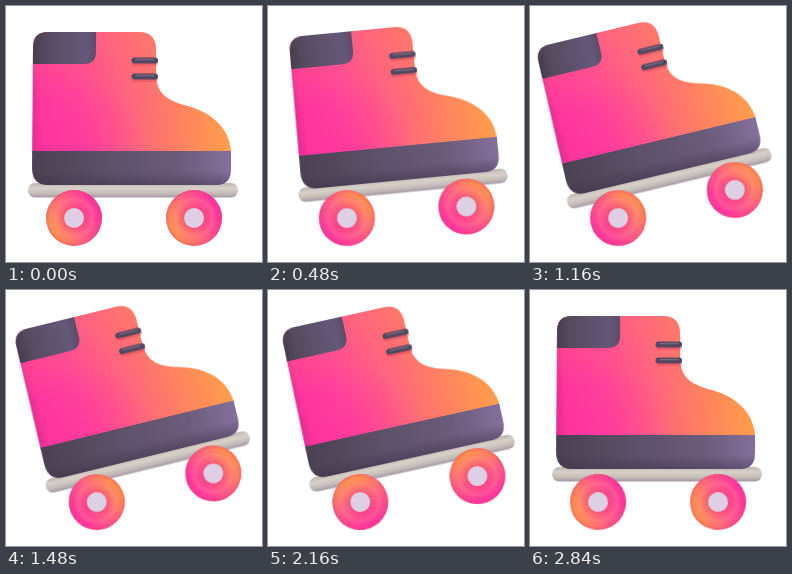
Animation, 256 px wide and 256 px high, one loop 2.88 s. Source, as an HTML page:

```html
<!DOCTYPE html>
<html lang="en">
<head>
<meta charset="utf-8">
<title>Roller skate</title>
<style>
  html, body { margin: 0; width: 100%; height: 100%; overflow: hidden; background: #fff; }
  svg { display: block; width: 100vw; height: 100vh; }

  .roll, .tilt, .body, .wheel { animation: 2880ms linear infinite; }
  .roll { animation-name: roll; }
  .tilt { animation-name: tilt; }
  .body { animation-name: settle; }
  .wheel { animation-name: spin; }
  .tilt, .rear { transform-origin: 68px 212px; }
  .front { transform-origin: 188px 212px; }

  @keyframes roll {
    0% { transform: translateX(0); animation-timing-function: cubic-bezier(.2, .5, .6, 1); }
    72.22% { transform: translateX(24.8px); animation-timing-function: cubic-bezier(.4, 0, .42, 1); }
    100% { transform: translateX(0); }
  }
  @keyframes tilt {
    0% { transform: rotate(0deg); animation-timing-function: cubic-bezier(.3, 0, .5, 1); }
    45.83%, 72.22% { transform: rotate(-13.8deg); animation-timing-function: cubic-bezier(.37, 0, .63, 1); }
    86.11%, 100% { transform: rotate(0deg); }
  }
  @keyframes settle {
    0% { transform: translateY(0); }
    30%, 75% { transform: translateY(1px); animation-timing-function: ease-in-out; }
    86.11% { transform: translateY(3.5px); animation-timing-function: ease-in-out; }
    98%, 100% { transform: translateY(0); }
  }
  @keyframes spin {
    0% { transform: rotate(0deg); animation-timing-function: cubic-bezier(.45, 0, .5, 1); }
    44.44%, 65% { transform: rotate(540deg); }
    75% { transform: rotate(465deg); }
    87.5% { transform: rotate(297deg); animation-timing-function: cubic-bezier(.3, .3, .6, 1); }
    100% { transform: rotate(0deg); }
  }
</style>
</head>
<body>
<svg viewBox="0 0 256 256">
  <defs>
    <linearGradient id="leather" gradientUnits="userSpaceOnUse" x1="26" y1="118" x2="226" y2="106">
      <stop offset="0" stop-color="#e02c90"/>
      <stop offset=".05" stop-color="#ff359f"/>
      <stop offset=".25" stop-color="#ff459a"/>
      <stop offset=".5" stop-color="#ff657f"/>
      <stop offset=".72" stop-color="#ff8062"/>
      <stop offset="1" stop-color="#ffa04a"/>
    </linearGradient>
    <linearGradient id="warmTop" x2="0" y2="1">
      <stop offset="0" stop-color="#ff8060" stop-opacity=".3"/>
      <stop offset=".6" stop-color="#ff8060" stop-opacity="0"/>
    </linearGradient>
    <radialGradient id="glow" gradientUnits="userSpaceOnUse" cx="72" cy="145" r="70">
      <stop offset="0" stop-color="#ff319f" stop-opacity=".5"/>
      <stop offset="1" stop-color="#ff319f" stop-opacity="0"/>
    </radialGradient>
    <linearGradient id="sole">
      <stop offset="0" stop-color="#4b4152"/>
      <stop offset=".3" stop-color="#594d63"/>
      <stop offset=".75" stop-color="#6c5c7c"/>
      <stop offset="1" stop-color="#85709b"/>
    </linearGradient>
    <linearGradient id="soleShade" x2="0" y2="1">
      <stop offset=".6" stop-color="#3d3049" stop-opacity="0"/>
      <stop offset="1" stop-color="#3d3049" stop-opacity=".45"/>
    </linearGradient>
    <linearGradient id="cuff">
      <stop offset="0" stop-color="#463c4c"/>
      <stop offset=".2" stop-color="#564a5e"/>
      <stop offset=".85" stop-color="#66587a"/>
      <stop offset="1" stop-color="#5d4c69"/>
    </linearGradient>
    <linearGradient id="board" x2="0" y2="1">
      <stop offset="0" stop-color="#bdb4b1"/>
      <stop offset=".35" stop-color="#d8d0c9"/>
      <stop offset=".7" stop-color="#c6bdb9"/>
      <stop offset="1" stop-color="#a498a6"/>
    </linearGradient>
    <linearGradient id="rubber" x1=".95" y1=".3" x2=".05" y2=".75">
      <stop offset=".08" stop-color="#ff379f"/>
      <stop offset=".5" stop-color="#ff5f83"/>
      <stop offset=".92" stop-color="#ff9250"/>
    </linearGradient>
    <radialGradient id="round">
      <stop offset=".34" stop-color="#d92f70" stop-opacity=".4"/>
      <stop offset=".5" stop-color="#f0487c" stop-opacity=".12"/>
      <stop offset=".68" stop-color="#ffb0a0" stop-opacity=".2"/>
      <stop offset=".85" stop-color="#f0487c" stop-opacity="0"/>
      <stop offset="1" stop-color="#d62f6c" stop-opacity=".4"/>
    </radialGradient>
    <clipPath id="boot">
      <path d="M42 26H133Q149 26 150 42V68C150 86 160 94 178 99C203 105 223 120 225 145V163Q225 179 210 179H42Q26 179 26 162L27 41Q27 26 42 26Z"/>
    </clipPath>
    <g id="wheelShape">
      <circle r="28" fill="url(#rubber)"/>
      <circle r="28" fill="url(#round)"/>
      <circle r="10" fill="#ded0e4"/>
    </g>
    <g id="lace" fill="none" stroke-linecap="round">
      <path d="M128.5 2.5H149" stroke="#d9475f" stroke-opacity=".45" stroke-width="6"/>
      <path d="M128.5 0H149" stroke="#54475f" stroke-width="6"/>
      <path d="M130 -1H148" stroke="#75677f" stroke-width="1.5"/>
    </g>
  </defs>

  <g class="roll">
    <g class="tilt">
      <g class="body">
        <rect x="22" y="177" width="210" height="14.5" rx="7" fill="url(#board)"/>
        <g clip-path="url(#boot)">
          <rect x="26" y="26" width="200" height="122" fill="url(#leather)"/>
          <rect x="26" y="26" width="200" height="122" fill="url(#warmTop)"/>
          <rect x="26" y="26" width="200" height="122" fill="url(#glow)"/>
          <path d="M26 26H90V46Q90 58 78 58H26Z" fill="url(#cuff)"/>
          <rect x="26" y="145" width="200" height="34" fill="url(#sole)"/>
          <rect x="26" y="145" width="200" height="34" fill="url(#soleShade)"/>
        </g>
        <use href="#lace" y="54.5"/>
        <use href="#lace" y="70.5"/>
      </g>
      <g class="wheel rear"><use href="#wheelShape" x="68" y="212"/></g>
      <g class="wheel front"><use href="#wheelShape" x="188" y="212"/></g>
    </g>
  </g>
</svg>
</body>
</html>
```
